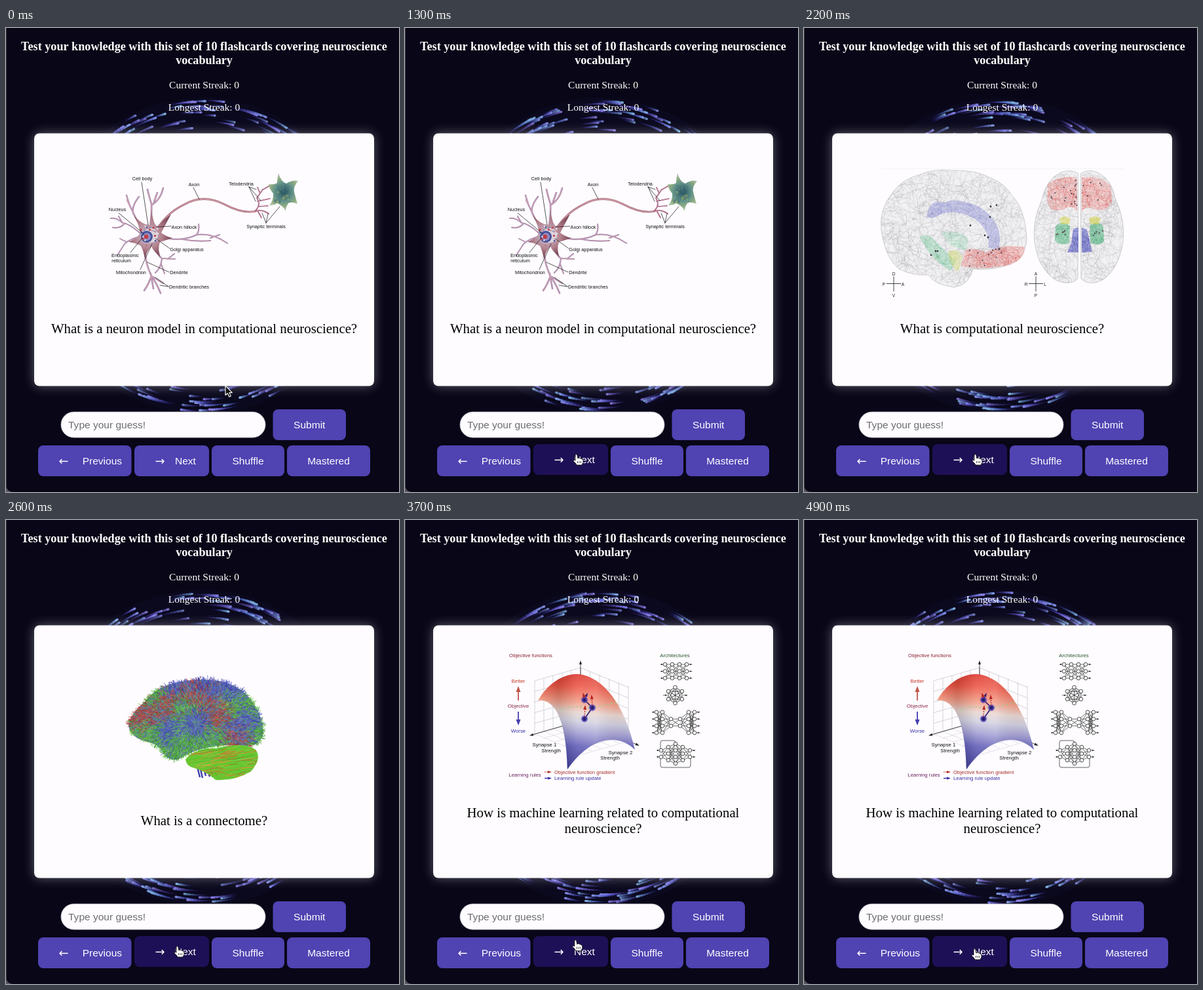
Animation, 600 px wide and 707 px high, one loop 5 s. Source, as an HTML page with a canvas:

```html
<!DOCTYPE html>
<html lang="en">
<head>
<meta charset="utf-8">
<title>Neuroscience flashcards</title>
<style>
  html, body { margin: 0; width: 100%; height: 100%; overflow: hidden; background: #080617; }
  canvas { display: block; }
</style>
</head>
<body>
<canvas id="stage" width="600" height="707"></canvas>
<script>
const W = 600, H = 707, LOOP = 5000, STEP = 100, TAU = Math.PI * 2;
const SERIF = '"Liberation Serif", Times, serif';
const SANS = '"Liberation Sans", Arial, sans-serif';
const ctx = document.getElementById('stage').getContext('2d');

function seeded(seed) {
  return () => {
    seed = (seed + 0x6D2B79F5) | 0;
    let v = Math.imul(seed ^ (seed >>> 15), 1 | seed);
    v = (v + Math.imul(v ^ (v >>> 7), 61 | v)) ^ v;
    return ((v ^ (v >>> 14)) >>> 0) / 4294967296;
  };
}
const clamp = v => Math.max(0, Math.min(1, v));
const ease = v => v * v * (3 - 2 * v);
const mix = (a, b, k) => a + (b - a) * k;

function put(g, text, x, y, font, color = '#000', align = 'center') {
  g.font = font;
  g.fillStyle = color;
  g.textAlign = align;
  g.fillText(text, x, y);
}
function stroke(g, d, color, width = 1) {
  g.strokeStyle = color;
  g.lineWidth = width;
  g.stroke(new Path2D(d));
}
function fill(g, d, color) {
  g.fillStyle = color;
  g.fill(new Path2D(d));
}
function dot(g, x, y, r, color) {
  g.fillStyle = color;
  g.beginPath();
  g.arc(x, y, r, 0, TAU);
  g.fill();
}
function box(g, x, y, w, h, r, color) {
  g.fillStyle = color;
  g.beginPath();
  g.roundRect(x, y, w, h, r);
  g.fill();
}
function arrow(g, x1, y1, x2, y2, color, width = 1, head = 4, dash = []) {
  const a = Math.atan2(y2 - y1, x2 - x1);
  g.setLineDash(dash);
  stroke(g, `M${x1} ${y1}L${x2} ${y2}`, color, width);
  g.setLineDash([]);
  g.save();
  g.translate(x2, y2);
  g.rotate(a);
  fill(g, `M2 0L${-head} ${-head / 2}L${-head} ${head / 2}Z`, color);
  g.restore();
}

// ---- Card pictures ----

function neuron(g) {
  g.lineCap = g.lineJoin = 'round';
  const limbs = [
    ['M212 308Q200 296 195 283L185 262M195 284Q190 274 203 257M189 271L184 255', 2],
    ['M220 302Q223 280 222 268Q218 255 216 246M222 270Q236 262 240 244M226 265L231 251', 2.2],
    ['M204 312Q188 298 178 297Q168 288 160 290M181 298Q174 306 163 304M178 297L172 287', 1.6],
    ['M205 318Q189 321 181 329L170 346M184 326L174 321', 1.4],
    ['M234 318Q268 327 291 315Q315 312 338 328M290 316Q296 310 294 299M270 322Q290 326 312 324M312 320L326 315', 1.7],
    ['M226 330Q230 346 238 351L258 352M238 351Q237 365 228 373M237 360L242 374M247 352L257 344', 1.8],
    ['M213 330Q210 352 222 378Q218 390 211 400M222 378Q230 389 236 404M221 374L225 397M224 379L240 389', 2.2]
  ];
  for (const [d, w] of limbs) {
    stroke(g, d, '#9d83ad', w + .4);
    stroke(g, d, '#d3a3b1', w * .55);
  }
  const axon = 'M231 306Q246 282 270 270Q300 252 332 268Q362 284 382 279';
  stroke(g, axon, '#9c596b', 2.8);
  stroke(g, axon, '#d9a9b3', 1.3);
  const ends = 'M380 279Q390 270 383 259L392 246M384 264L403 260M380 279Q392 276 401 283M385 272L400 271M385 280L390 289M391 247L403 240M388 252L384 243';
  stroke(g, ends, '#a5506a', 1.7);
  stroke(g, ends, '#bd9bbd', .6);

  const body = g.createRadialGradient(215, 318, 5, 217, 312, 34);
  body.addColorStop(0, '#c5b3c7');
  body.addColorStop(.6, '#b2818c');
  body.addColorStop(1, '#83505f');
  fill(g, 'M195 285Q207 300 219 300Q222 292 222 277Q225 300 231 302Q240 292 252 284Q242 302 237 312Q245 318 254 320Q239 325 235 326Q231 338 236 349Q225 340 222 333Q215 339 212 352Q210 340 206 332Q197 327 187 326Q202 319 204 313Q205 303 195 285Z', body);
  dot(g, 221, 316, 11, '#dcd2dc');
  dot(g, 215, 318, 9, '#45539b');
  dot(g, 215, 318, 6, '#938bc2');
  dot(g, 214, 318, 3.2, '#c23b45');
  const rnd = seeded(7);
  for (let i = 0; i < 26; i++) {
    const a = rnd() * TAU, r = 8 + rnd() * 8;
    dot(g, 219 + Math.cos(a) * r, 316 + Math.sin(a) * r, .7 + rnd(), ['#c04750', '#4965a8', '#e6d9e3'][i % 3]);
  }

  const cell = g.createRadialGradient(424, 250, 3, 424, 250, 28);
  cell.addColorStop(0, '#315f68');
  cell.addColorStop(.45, '#65948b');
  cell.addColorStop(.75, '#91ad82');
  cell.addColorStop(1, '#b8c9b7');
  fill(g, 'M416 221Q420 235 428 237Q437 231 446 233Q438 242 440 250Q442 258 445 268Q435 264 431 267Q427 273 427 279Q422 270 414 267Q408 271 402 270Q409 262 408 252Q402 245 401 238Q410 239 414 236Q414 228 416 221Z', cell);
  for (let i = 0; i < 28; i++) dot(g, 411 + rnd() * 25, 240 + rnd() * 25, 1 + rnd() * 1.8, ['#47777d80', '#a7b76580', '#355f7380'][i % 3]);

  stroke(g, 'M207 235L217 300M172 282L211 314M286 243L295 261M371 242L382 246M371 242L381 264M371 242L389 263M397 297L391 282M397 297L400 283M397 297L418 272M252 302L230 303M250 336L229 321M190 342L208 320M205 368L223 329M249 372L216 357M248 394L228 380M248 394L235 392', '#111', .7);
  const names = [['Cell body', 208, 232], ['Nucleus', 170, 279], ['Axon', 287, 241], ['Telodendria', 359, 240],
    ['Synaptic terminals', 397, 305], ['Axon hillock', 272, 306], ['Golgi apparatus', 276, 340],
    ['Endoplasmic', 182, 349], ['reticulum', 176, 357], ['Mitochondrion', 191, 375],
    ['Dendrite', 264, 375], ['Dendritic branches', 279.5, 397]];
  for (const [s, x, y] of names) put(g, s, x, y, `7.3px ${SANS}`, '#111');
}

// Thin wandering lines kept inside a shape.
function scribble(g, d, [x, y, w, h], n, color, seed, len = 4) {
  const rnd = seeded(seed);
  g.save();
  g.clip(new Path2D(d));
  g.strokeStyle = color;
  g.lineWidth = .6;
  for (let i = 0; i < n; i++) {
    let px = x + rnd() * w, py = y + rnd() * h, a = rnd() * TAU;
    const turn = (rnd() - .5) * .9;
    g.beginPath();
    g.moveTo(px, py);
    for (let k = 0; k < 13; k++) {
      a += turn + (rnd() - .5) * .9;
      px += Math.cos(a) * len;
      py += Math.sin(a) * len;
      g.lineTo(px, py);
    }
    g.stroke();
  }
  g.restore();
}
function region(g, d, bounds, base, line, n, seed) {
  fill(g, d, base);
  scribble(g, d, bounds, n, line, seed, 2.5);
}
function compass(g, x, y, [top, right, bottom, left]) {
  stroke(g, `M${x - 11} ${y}H${x + 11}M${x} ${y - 11}V${y + 12}`, '#333', .9);
  const f = `6.5px ${SANS}`;
  put(g, top, x, y - 13, f, '#222');
  put(g, bottom, x, y + 20, f, '#222');
  put(g, left, x - 15, y + 3, f, '#222');
  put(g, right, x + 14, y + 3, f, '#222');
}
function brains(g) {
  stroke(g, 'M117 214.5H490', '#f5f3f7', 1);
  const side = 'M118 308Q114 276 136 250Q150 230 178 223Q198 214 226 217Q262 216 284 228Q306 236 318 256Q338 276 340 322Q338 350 316 360Q286 370 258 367Q252 392 229 395Q200 392 190 376Q165 378 145 367Q124 350 118 308Z';
  const left = 'M419 222Q408 214 392 220Q370 230 363 262Q348 294 352 326Q357 366 384 384Q406 394 418 382Z';
  const right = 'M422 222Q434 214 448 220Q470 230 476 262Q491 294 487 326Q481 366 456 384Q434 394 423 382Z';
  for (const [d, b, n, s] of [[side, [117, 215, 224, 182], 620, 3], [left, [350, 216, 70, 176], 230, 5], [right, [421, 216, 68, 176], 230, 6]]) {
    fill(g, d, '#f1f0f2');
    scribble(g, d, b, n, 'rgba(110,110,116,.22)', s);
    stroke(g, d, '#c2c2c6', .8);
  }
  const blue = 'rgba(135,137,215,.38)', green = 'rgba(135,210,170,.4)', red = 'rgba(240,150,144,.36)';
  const blueLine = 'rgba(80,82,185,.24)', greenLine = 'rgba(60,160,105,.28)', redLine = 'rgba(211,56,52,.32)';
  region(g, 'M187 288Q190 266 204 264Q216 268 222 263Q262 261 287 289Q304 310 297 340L282 334Q284 308 260 290Q232 276 208 284Q198 292 187 288Z', [185, 262, 115, 80], blue, blueLine, 130, 11);
  region(g, 'M176 318Q188 310 202 326L232 356L224 370Q195 355 176 318Z', [175, 312, 60, 60], green, greenLine, 60, 12);
  region(g, 'M209 313Q230 304 250 320L248 340L225 332Z', [207, 308, 45, 34], 'rgba(140,220,175,.25)', 'rgba(60,170,110,.18)', 30, 18);
  region(g, 'M220 342Q234 332 242 349L236 371Q225 368 220 342Z', [218, 336, 26, 36], 'rgba(218,225,130,.42)', 'rgba(170,180,50,.28)', 26, 13);
  region(g, 'M240 363L246 338Q262 334 278 342Q304 328 337 334Q338 351 316 360Q272 370 240 363Z', [238, 328, 100, 40], red, redLine, 150, 14);
  region(g, 'M372 238Q392 223 417 228V280Q410 268 397 276Q374 284 371 262ZM424 228Q448 223 468 239L471 262Q466 282 441 276Q430 270 424 280Z', [368, 225, 106, 58], red, redLine, 150, 15);
  region(g, 'M384 302Q394 291 406 302L405 327Q393 334 383 324ZM436 302Q446 291 457 302L458 325Q448 334 437 327Z', [380, 294, 80, 40], 'rgba(96,190,140,.55)', 'rgba(40,145,88,.36)', 80, 16);
  region(g, 'M390 290Q398 284 406 290L405 299L392 299ZM435 290Q444 284 453 290L450 299L437 299Z', [388, 285, 66, 15], 'rgba(221,221,102,.55)', 'rgba(190,190,40,.5)', 40, 19);
  region(g, 'M411 306L419 304V342L402 342L408 328ZM424 304L432 307L437 329L440 341L424 342Z', [400, 303, 42, 41], 'rgba(96,98,200,.55)', 'rgba(62,63,162,.4)', 60, 17);
  stroke(g, 'M420.5 218V388', '#fff', 2);
  const rnd = seeded(23);
  const spots = (n, x, y, w, h) => {
    for (let i = 0; i < n; i++) dot(g, x + rnd() * w, y + rnd() * h, 1.1, '#5a4650');
  };
  spots(11, 248, 337, 54, 26);
  spots(6, 373, 236, 28, 30);
  spots(12, 404, 232, 14, 40);
  spots(6, 426, 234, 40, 30);
  spots(6, 384, 309, 20, 7);
  spots(5, 440, 309, 16, 7);
  for (const [x, y] of [[285, 272], [294, 270], [284, 288], [254, 301], [276, 316], [281, 319], [194, 346], [201, 340], [204, 340], [298, 337]]) dot(g, x, y, 1.4, '#393945');
  compass(g, 137, 389.5, 'DAVP');
  compass(g, 354, 389.5, 'ALPR');
}

function connectome(g) {
  const rnd = seeded(41);
  const shape = 'M187 314Q190 295 212 277Q236 244 300 243Q348 244 371 270Q392 296 393 325Q388 342 372 344L330 343Q289 348 270 361Q257 370 243 360Q238 345 218 338Q192 334 187 314Z';
  const path = new Path2D(shape);
  const hues = { b: [238, 50, 52], g: [106, 56, 47], r: [3, 54, 47] };
  const zones = [['b', 300, 248], ['b', 255, 254], ['b', 346, 260], ['b', 288, 313], ['b', 246, 325], ['b', 370, 302], ['b', 350, 318],
    ['r', 248, 278], ['r', 215, 291], ['r', 328, 299], ['r', 288, 266], ['r', 345, 332], ['r', 205, 306],
    ['g', 270, 286], ['g', 200, 324], ['g', 246, 353], ['g', 288, 338], ['g', 348, 288], ['g', 388, 326], ['g', 226, 268], ['g', 377, 279], ['g', 322, 334], ['g', 262, 342], ['g', 225, 328]];
  stroke(g, 'M291 372L296 392M295 371L300 393M300 370L305 390M304 371L311 391', '#3c3cae', 2.4);
  fill(g, shape, '#5b7c98');
  for (let i = 0; i < 9000; i++) {
    const x = 181 + rnd() * 218, y = 237 + rnd() * 138;
    if (!g.isPointInPath(path, x, y)) continue;
    let best = 1e9, kind = 'g';
    for (const [c, zx, zy] of zones) {
      const d = Math.hypot(x - zx, y - zy) + rnd() * 32;
      if (d < best) { best = d; kind = c; }
    }
    const [h, s, l] = hues[kind];
    const a = Math.atan2(y - 308, x - 290) + (rnd() - .5) * 1.6, len = 2 + rnd() * 5;
    stroke(g, `M${x} ${y}q${Math.cos(a + .5) * len / 2} ${Math.sin(a + .5) * len / 2} ${Math.cos(a) * len} ${Math.sin(a) * len}`,
      `hsl(${h + rnd() * 16 - 8} ${s}% ${l + rnd() * 26 - 13}%)`, .8);
  }
  const lobe = 'M274 365Q286 348 322 348Q364 337 381 350Q391 363 374 383Q349 398 320 396Q306 383 285 377Q276 375 274 365Z';
  fill(g, lobe, '#68c631');
  g.save();
  g.clip(new Path2D(lobe));
  for (let i = 0; i < 270; i++) {
    const x = 270 + rnd() * 112, y = 344 + rnd() * 53, n = 10 + rnd() * 22;
    const warm = rnd() < .22 + (x - 270) / 300;
    stroke(g, `M${x} ${y}q${n / 2} ${(370 - y) * .25 - 3} ${n} ${(370 - y) * -.08 - 4}`,
      `hsl(${warm ? 22 + rnd() * 25 : 92 + rnd() * 20} 62% ${42 + rnd() * 13}%)`, .9);
  }
  g.restore();
}

// Fully connected columns of nodes: [x, rows, gap].
function net(g, cols, cy) {
  const nodes = cols.map(([x, n, gap]) => Array.from({ length: n }, (_, i) => [x, cy + (i - (n - 1) / 2) * gap]));
  const ring = ([x, y]) => {
    dot(g, x, y, 2.8, '#fff');
    g.strokeStyle = '#222';
    g.lineWidth = .8;
    g.stroke();
  };
  nodes.slice(1).forEach((col, i) => {
    for (const [x, y] of col) for (const [px, py] of nodes[i]) stroke(g, `M${px} ${py}L${x} ${y}`, '#222', .65);
  });
  for (const [x, y] of nodes[0]) arrow(g, x - 7, y, x - 4, y, '#222', .7, 2);
  for (const [x, y] of nodes[nodes.length - 1]) arrow(g, x + 3, y, x + 7, y, '#222', .7, 2);
  nodes.flat().forEach(ring);
  return ring;
}
function learning(g) {
  for (let i = 0; i <= 5; i++) {
    const k = i / 5, xl = mix(268, 198, k), xr = mix(268, 341, k);
    stroke(g, `M${xl} ${mix(225, 245, k)}V${mix(306, 326, k)}M${xr} ${mix(225, 253, k)}V${mix(306, 337, k)}`, '#b9b9be', .6);
    const y = mix(225, 306, k);
    stroke(g, `M198 ${y + 20}L268 ${y}L341 ${y + 30}`, '#b9b9be', .6);
    stroke(g, `M${xl} ${mix(306, 326, k)}l73 30M${xr} ${mix(306, 337, k)}l-70 20`, '#c9c9ce', .5);
  }
  arrow(g, 268, 306, 268, 216, '#222', .8);
  arrow(g, 268, 306, 192, 328, '#222', .8);
  arrow(g, 268, 306, 356, 343, '#222', .8);

  const shape = 'M203 275C220 245 250 230 272 236C311 246 338 293 351 350C328 327 286 326 248 380C247 334 239 271 203 275Z';
  const shade = g.createLinearGradient(278, 234, 265, 380);
  [[0, '#da2f27'], [.15, '#ec5544'], [.3, '#f29a84'], [.41, '#e8d5d0'], [.5, '#d1cfdf'], [.61, '#a5a1d4'], [.76, '#5c58b5'], [1, '#302e8b']]
    .forEach(([k, c]) => shade.addColorStop(k, c));
  fill(g, shape, shade);
  g.save();
  g.clip(new Path2D(shape));
  const shine = g.createLinearGradient(205, 0, 350, 0);
  [[0, '#0000'], [.2, '#0002'], [.4, '#fff2'], [.6, '#fff3'], [1, '#0000']].forEach(([k, c]) => shine.addColorStop(k, c));
  g.fillStyle = shine;
  g.fillRect(200, 230, 155, 155);
  g.setLineDash([3, 3]);
  stroke(g, 'M238 290Q256 281 270 286Q294 287 324 277', '#9bd08a', 1.2);
  g.setLineDash([]);
  g.restore();

  stroke(g, 'M274 303L286 286L274 274', '#33236d', 1.7);
  arrow(g, 274, 274, 278, 265, '#33236d', 1.5, 4);
  for (const [x, y, dx, dy] of [[274, 303, 1, -19], [286, 286, -1, -18], [274, 274, -2, -9]]) {
    const glow = g.createRadialGradient(x, y, 1, x, y, 6);
    glow.addColorStop(0, '#241a61');
    glow.addColorStop(.45, '#4337a6');
    glow.addColorStop(1, '#6058c800');
    dot(g, x, y, 6, glow);
    arrow(g, x, y - 3, x + dx, y + dy, '#b82620', 1.2, 5, [2, 1.5]);
  }

  const f = `7.8px ${SANS}`, wine = '#87202f', red = '#c13a2c', blue = '#352fa5';
  put(g, 'Objective functions', 192, 209, f, wine);
  put(g, 'Better', 173, 248, f, red);
  put(g, 'Objective', 173, 286, f, '#8b2b4a');
  put(g, 'Worse', 173, 324, f, blue);
  arrow(g, 173, 275, 173, 255, '#c0554b', 1.8, 7);
  arrow(g, 173, 292, 173, 311, '#443eae', 1.8, 7);
  put(g, 'Synapse 1', 213, 345, f, '#111');
  put(g, 'Strength', 223, 354, f, '#111');
  put(g, 'Synapse 2', 329, 357, f, '#111');
  put(g, 'Strength', 313, 365, f, '#111');
  put(g, 'Learning rules', 183, 391, f, '#68235d');
  put(g, 'Objective function gradient', 228, 387, f, '#a52d27', 'left');
  put(g, 'Learning rule update', 228, 396, f, blue, 'left');
  arrow(g, 213, 384, 222, 384, '#b0342b', 1.2, 4, [2, 1]);
  arrow(g, 213, 393.5, 222, 393.5, blue, 1.4, 4);

  put(g, 'Architectures', 412, 209, f, '#28562d');
  net(g, [[397, 3, 10.5], [408, 3, 10.5], [419, 3, 10.5], [430, 3, 10.5]], 230.5);
  const hex = Array.from({ length: 6 }, (_, i) => [412.5 + Math.sin(i * TAU / 6) * 12, 267 - Math.cos(i * TAU / 6) * 12]);
  for (const [x, y] of hex) for (const [u, v] of hex) stroke(g, `M${x} ${y}L${u} ${v}`, '#222', .5);
  arrow(g, 394, 267, 399, 267, '#222', .7, 2);
  arrow(g, 425, 267, 430, 267, '#222', .7, 2);
  const ring = net(g, [[384, 4, 10.5], [393, 4, 10.5], [406, 2, 10.5], [420, 2, 10.5], [433, 4, 10.5], [442, 4, 10.5]], 308.5);
  hex.forEach(ring);
  stroke(g, 'M390 352V339Q390 336 393 336H410Q413 336 413 340M390 359V374Q390 377 393 377H433Q436 377 436 374V357', '#222', .7);
  net(g, [[391, 2, 10], [402, 3, 10], [413, 4, 10], [424, 3, 10], [435, 2, 10]], 356);
}

function makeCard(draw, ...lines) {
  const c = document.createElement('canvas');
  c.width = W;
  c.height = H;
  const g = c.getContext('2d');
  draw(g);
  lines.forEach((s, i) => put(g, s, 302.5, 465 - (lines.length - 1) * 12 + i * 24, `20.8px ${SERIF}`));
  return c;
}
const cards = [
  [0, makeCard(neuron, 'What is a neuron model in computational neuroscience?')],
  [1400, makeCard(brains, 'What is computational neuroscience?')],
  [2400, makeCard(connectome, 'What is a connectome?')],
  [3600, makeCard(learning, 'How is machine learning related to computational', 'neuroscience?')]
];

// ---- Page ----

const rnd = seeded(99);
const trails = Array.from({ length: 125 }, () => ({
  r: 184 + Math.sqrt(rnd()) * 53, a: rnd() * Math.PI, len: .09 + rnd() * .11, hue: 208 + rnd() * 44, glow: .6 + rnd() * .4
}));

// Tapered streaks turning clockwise; half a turn repeats the pattern.
function drawTrails(t) {
  dot(ctx, 300, 347, 241, '#0b091d');
  const parts = 8, turn = t / LOOP * Math.PI;
  for (const { r, a, len, hue, glow } of trails) {
    for (const half of [0, Math.PI]) {
      const head = a + turn + half;
      if (Math.abs(Math.sin(head)) < .65) continue;
      for (let i = 0; i < parts; i++) {
        const k = (i + 1) / parts, from = head - len * (1 - i / parts);
        ctx.strokeStyle = `hsla(${mix(250, hue, k)},62%,${mix(48, 68, k)}%,${k * glow})`;
        ctx.lineWidth = mix(1, 3.4, k);
        ctx.beginPath();
        ctx.arc(300, 347, r, from, from + len / parts);
        ctx.stroke();
      }
      dot(ctx, 300 + r * Math.cos(head), 347 + r * Math.sin(head), 1.7, `hsla(${hue},65%,70%,${glow})`);
    }
  }
}

const buttons = [
  ['Submit', 407.5, 581, 111.5, []],
  ['← Previous', 49, 636, 142.5, []],
  ['→ Next', 196, 636, 114, [[1050, 3700], [4450, 6000]]],
  ['Shuffle', 314, 636, 111, [[500, 1000]]],
  ['Mastered', 429, 636, 127, []]
];
function drawButton([label, x, y, w, hovers], t) {
  const k = hovers.reduce((m, [on, off]) => Math.max(m, ease(clamp((t - on) / 250)) * (1 - ease(clamp((t - off) / 250)))), 0);
  const top = y - 2 * k, base = top + 28.8, font = `15.52px ${SANS}`;
  box(ctx, x, top, w, 47, 8, `rgb(${mix(80, 30, k)},${mix(67, 16, k)},${mix(178, 86, k)})`);
  const [word, sign] = label.split(' ').reverse();
  if (!sign) return put(ctx, word, x + w / 2, base, font, '#fff');
  ctx.font = font;
  const left = x + (w - ctx.measureText(label).width) / 2;
  put(ctx, sign, left + 7.8, base + 1, '18px "DejaVu Sans", sans-serif', '#fff');
  put(ctx, word, left + ctx.measureText(label).width, base, font, '#fff', 'right');
}
// Label widths are measured in the button font, the arrows drawn in a wider one.

const route = [[0, 335, 545], [550, 351, 643], [900, 351, 643], [1200, 262, 649], [3600, 262, 649],
  [3950, 256, 601], [4200, 256, 601], [4550, 261, 653], [5000, 261, 653]];
function drawCursor(t) {
  const i = route.findIndex(p => p[0] > t), [t0, x0, y0] = route[i - 1], [t1, x1, y1] = route[i];
  const k = ease((t - t0) / (t1 - t0)), x = mix(x0, x1, k), y = mix(y0, y1, k);
  ctx.save();
  ctx.translate(x, y);
  ctx.lineJoin = 'round';
  if (y > 584 && y < 624) {
    const beam = 'M-3 -7Q0 -7 0 -4V5Q0 8 -3 8M3 -7Q0 -7 0 -4M0 5Q0 8 3 8';
    stroke(ctx, beam, '#fff', 3);
    stroke(ctx, beam, '#111', 1.2);
  } else if (y > 635) {
    const hand = 'M-2 1Q0 -1 1 2L2 7L3 6Q5 5 5.5 7Q8 6 8 8Q10 8 10 10V13Q9 15 8 17H0Q-1 14 -5 11Q-5 8 -2 10Z';
    fill(ctx, hand, '#fff');
    stroke(ctx, hand, '#111', 1);
    stroke(ctx, 'M1.5 11V14M4 11V14M6.5 11V14', '#111', .8);
  } else {
    const tip = 'M0 0V14.5L3.3 11.5L5.7 17L8.3 15.9L6 10.6H10.3Z';
    fill(ctx, tip, '#111');
    stroke(ctx, tip, '#fff', 1.1);
  }
  ctx.restore();
}

function draw(t) {
  ctx.fillStyle = '#080617';
  ctx.fillRect(0, 0, W, H);
  drawTrails(t);
  ctx.fillStyle = '#37363f';
  ctx.fillRect(0, 0, 1, H);
  fill(ctx, 'M0 697Q1 706 10 707H0Z', '#55545c');

  put(ctx, 'Test your knowledge with this set of 10 flashcards covering neuroscience', 302.5, 34, `bold 18.16px ${SERIF}`, '#fff');
  put(ctx, 'vocabulary', 302.5, 55, `bold 18.16px ${SERIF}`, '#fff');
  put(ctx, 'Current Streak: 0', 302.5, 92, `15.52px ${SERIF}`, '#fff');
  put(ctx, 'Longest Streak: 0', 302.5, 125.5, `15.52px ${SERIF}`, '#fff');

  ctx.save();
  ctx.shadowColor = 'rgba(255,255,255,.36)';
  ctx.shadowBlur = 17;
  box(ctx, 43, 160.5, 519, 385, 8, '#fefcff');
  ctx.restore();
  ctx.drawImage(cards.filter(c => c[0] <= t).pop()[1], 0, 0);

  box(ctx, 84, 585, 312, 39, 19.5, '#fefcff');
  ctx.strokeStyle = '#c9c7d2';
  ctx.lineWidth = .8;
  ctx.stroke();
  put(ctx, 'Type your guess!', 95, 610, `15.52px ${SANS}`, '#6c6c6f', 'left');
  buttons.forEach(b => drawButton(b, t));
  drawCursor(t);
}

const start = performance.now();
let last = -1;
function tick() {
  const t = Math.floor((performance.now() - start) % LOOP / STEP) * STEP;
  if (t !== last) draw(last = t);
  requestAnimationFrame(tick);
}
tick();
</script>
</body>
</html>
```
